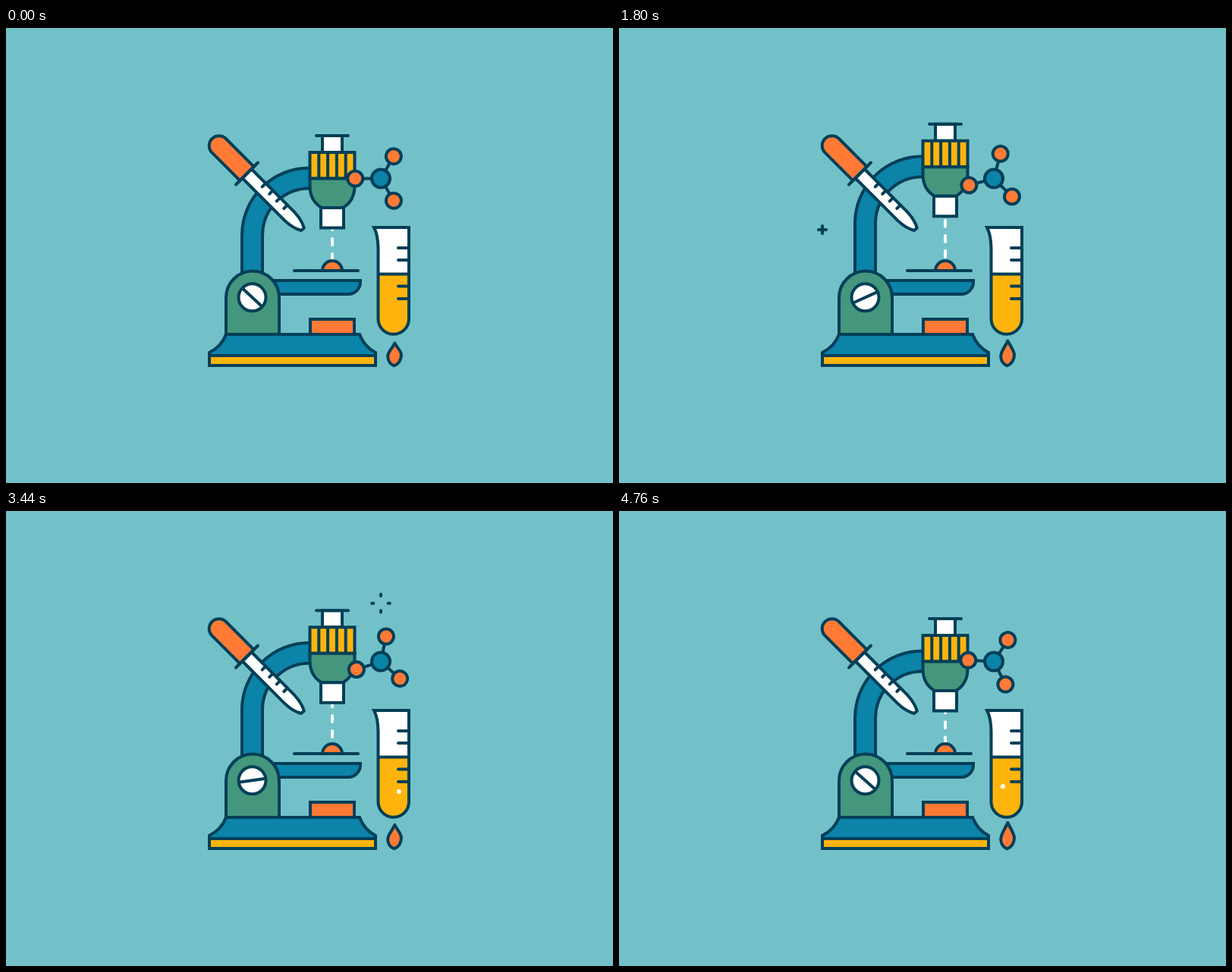
Recreate the animation shown at these times as an HTML page. Size 800 by 600 pixels, loop 4800 ms.

```html
<!DOCTYPE html>
<html lang="en">
<head>
<meta charset="utf-8">
<title>Microscope</title>
<style>
  html, body { margin: 0; width: 100%; height: 100%; overflow: hidden; background: #72c1c9; }
  svg { display: block; width: 100vw; height: 100vh; }
  .ink { stroke: #033f58; stroke-width: 4; fill: none; }
  .round { stroke-linecap: round; stroke-linejoin: round; }
  .blue { fill: #0c83a9; }
  .green { fill: #44977c; }
  .yellow { fill: #ffb40d; }
  .orange { fill: #ff7a35; }
  .white { fill: #fff; }
</style>
</head>
<body>
<svg viewBox="0 0 800 600">
  <g class="ink">
    <!-- arm -->
    <g id="arm" fill="none">
      <path d="M324.5 350V273A75.5 75 0 0 1 400 198H410" stroke-width="31"/>
      <path d="M324.5 350V273A75.5 75 0 0 1 400 198H410" stroke="#0c83a9" stroke-width="23"/>
    </g>

    <!-- stage, housing and base -->
    <path class="blue" d="M345 333H467V335A16 16 0 0 1 451 351H345Z"/>
    <path class="green" d="M290 404V355.5A35 35 0 0 1 360 355.5V404Z"/>
    <circle class="white" cx="324.5" cy="355.3" r="18"/>
    <path id="slot" d="M306.5 355.3H342.5"/>
    <path class="orange" d="M401 384H459V404H401Z"/>
    <path class="blue" d="M268 432V428Q284 420 290 404H466Q472 420 487 428V432Z"/>
    <path class="yellow" d="M268 432H487V445H268Z"/>

    <!-- light and sample -->
    <path id="light" class="round" d="M430 218V314" stroke="#fff" stroke-dasharray="8 12"/>
    <path class="orange" d="M417 320A13 13 0 0 1 443 320Z"/>
    <path class="round" d="M380 320H464"/>

    <!-- head -->
    <g id="head">
      <path class="white" d="M417 142H443V164H417Z"/>
      <path class="round" d="M409 142H451"/>
      <path class="yellow" d="M400.5 164H459.5V198.5H400.5Z"/>
      <path d="M412.3 164V198M424.1 164V198M435.9 164V198M447.7 164V198"/>
      <path class="green" d="M400.5 198.5H459.5V208Q459.5 228 444 237H416Q400.5 228 400.5 208Z"/>
      <path class="white" d="M415 237H445V263.5H415Z"/>
    </g>

    <!-- pipette, drawn along its axis -->
    <g transform="translate(317.5 192) rotate(45)">
      <path class="white" d="M0 -8.5H80Q94 -8 104 -2.5L103.6 2.5Q94 8 80 8.5H0Z" stroke-linejoin="round"/>
      <path class="round" d="M26.5 -8.5V-2M40 -8.5V-2M53.5 -8.5V-2M67 -8.5V-2"/>
      <path class="orange" d="M0 -13H-52A13 13 0 0 0 -52 13H0Z"/>
      <path class="round" d="M0 -20.5V20.5"/>
    </g>

    <!-- molecule -->
    <g id="molecule"></g>

    <!-- test tube -->
    <g id="tube">
      <path class="white" stroke="none" d="M485 263H531V330H490.5V290Q490 272 485 263Z"/>
      <path class="yellow" stroke="none" d="M490.5 324.5H531V383.5A20.25 20.25 0 0 1 490.5 383.5Z"/>
      <g id="bubbles" class="white" stroke="none"></g>
      <path d="M490.5 324.5H531"/>
      <path class="round" d="M517 290H531M517 306H531M517 340.5H531M517 357H531"/>
      <path d="M485 263H531V383.5A20.25 20.25 0 0 1 490.5 383.5V290Q490 272 485 263Z"/>
    </g>

    <path id="flame" class="orange round"/>
    <g id="sparkles" class="round"></g>
  </g>
</svg>
<script>
  const LOOP = 4800;
  const $ = id => document.getElementById(id);
  const clamp = v => Math.max(0, Math.min(1, v));

  const add = (parent, tag, attrs = {}) => {
    const node = document.createElementNS("http://www.w3.org/2000/svg", tag);
    for (const k in attrs) node.setAttribute(k, attrs[k]);
    return parent.appendChild(node);
  };

  const molecule = $("molecule");
  for (const angle of [60, 180, 300]) {
    const arm = add(molecule, "g", { transform: `rotate(${angle} 494 198.5)` });
    add(arm, "path", { d: "M494 198.5H528" });
    add(arm, "circle", { class: "orange", cx: 527.8, cy: 198.5, r: 10 });
  }
  add(molecule, "circle", { class: "blue", cx: 494, cy: 198.5, r: 12 });

  const sparkles = [
    { x: 494, y: 121.7, start: 820 },
    { x: 268, y: 266, start: 1720 },
    { x: 494, y: 121.7, start: 3056 },
    { x: 268, y: 266, start: 3724 }
  ].map(s => ({ ...s, node: add($("sparkles"), "path") }));

  const bubbles = [
    { x: 518, start: 2170 },
    { x: 518, start: 3000 },
    { x: 506, start: 4200 }
  ].map(b => ({ ...b, node: add($("bubbles"), "circle", { cx: b.x }) }));

  function drawSparkle({ x, y, start, node }, t) {
    const p = (t - start) / 480;
    if (p < 0 || p >= 1) return node.setAttribute("d", "");
    const outer = 12 * (1 - (1 - p) ** 3);
    const inner = 12 * p;
    const rays = [[1, 0], [-1, 0], [0, 1], [0, -1]].map(([dx, dy]) =>
      `M${x + dx * inner} ${y + dy * inner}L${x + dx * outer} ${y + dy * outer}`);
    node.setAttribute("d", rays.join(""));
  }

  function drawBubble({ start, node }, t) {
    const p = (t - start) / 600;
    const on = p >= 0 && p < 1;
    node.setAttribute("r", on ? 3 * clamp(p * 5) : 0);
    node.setAttribute("cy", 395 - 34 * clamp(p));
  }

  function draw(t) {
    const swing = 1 - Math.abs(1 - 2 * t / LOOP);
    const wave = (1 - Math.cos(2 * Math.PI * t / LOOP)) / 2;

    const lift = `translate(0 ${-17.9 * wave})`;
    $("head").setAttribute("transform", lift);
    $("arm").setAttribute("transform", lift);
    $("slot").setAttribute("transform", `rotate(${43 - 90 * swing} 324.5 355.3)`);
    $("light").setAttribute("stroke-dashoffset", -21 * swing);
    molecule.setAttribute("transform", `rotate(${-360 * t / LOOP} 494 198.5)`);

    const tilt = -0.4 * Math.sin(Math.PI * clamp((t - 2400) / 480));
    $("tube").setAttribute("transform", `rotate(${tilt} 508 263)`);

    const flick = (1 - Math.cos(Math.PI * clamp((t % 240) / 200))) / 2;
    const tip = 415.5 - 4.5 * flick;
    $("flame").setAttribute("d",
      `M512.3 ${tip}C509 ${tip + 8} 503.2 426 503.2 433C503.2 439 507 443.5 511.5 445.3` +
      `C517 443.5 521 438 521 431C521 426 516 ${tip + 7} 512.3 ${tip}Z`);

    sparkles.forEach(s => drawSparkle(s, t));
    bubbles.forEach(b => drawBubble(b, t));
  }

  const begin = performance.now();
  const tick = () => {
    draw((performance.now() - begin) % LOOP);
    requestAnimationFrame(tick);
  };
  tick();
</script>
</body>
</html>
```
